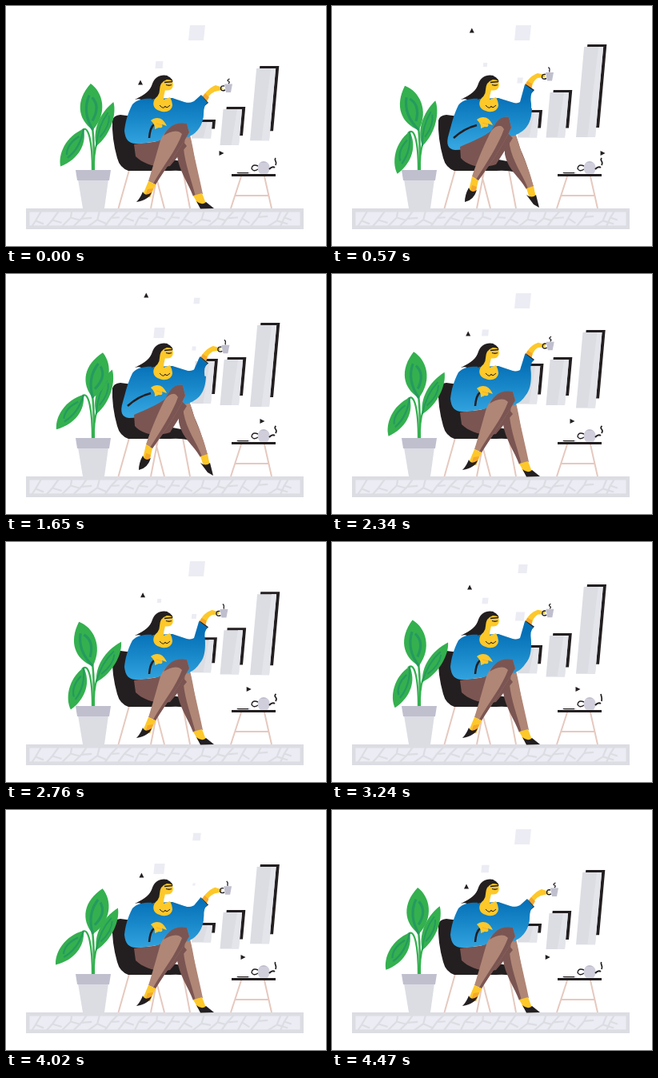
Write an HTML page with a canvas that moves like this. It is 400 by 300 pixels and loops after 4500 ms.

```html
<!DOCTYPE html>
<html lang="en">
<head>
<meta charset="utf-8">
<title>Coffee break</title>
<style>
html, body { margin: 0; width: 100%; height: 100%; overflow: hidden; background: #fff; }
canvas { display: block; }
</style>
</head>
<body>
<canvas id="stage" width="400" height="300"></canvas>
<script>
const ctx = document.getElementById('stage').getContext('2d');
const LOOP = 4500;
const BLACK = '#231f20', GREY = '#dcdde3', PALE = '#ececf4', LILAC = '#c0bfce',
      PINK = '#e6c9bf', SKIN = '#fdc82a', SHADE = '#f7a62b', LEAF = '#34b04f',
      LEAF_DARK = '#259a60', BROWN = '#7b5552', TAN = '#b08676';

const TIMES = [0, 570, 1095, 1650, 2340, 3240, 4020];

// Smooth periodic curve through values at TIMES, flat at its turning points.
function curve(t, values) {
  const n = TIMES.length;
  const time = k => TIMES[(k + n) % n] + LOOP * Math.floor(k / n);
  const value = k => values[(k + n) % n];
  const slope = k => (value(k + 1) - value(k)) / (time(k + 1) - time(k));
  const tangent = k => {
    const a = slope(k - 1), b = slope(k);
    return a * b > 0 ? 2 * a * b / (a + b) : 0;
  };
  let i = n - 1;
  while (TIMES[i] > t) i--;
  const h = time(i + 1) - time(i), s = (t - time(i)) / h;
  return value(i) * (1 + 2 * s) * (1 - s) ** 2 + value(i + 1) * s * s * (3 - 2 * s)
    + h * s * (1 - s) * (tangent(i) * (1 - s) - tangent(i + 1) * s);
}

const wave = (t, mean, amp, peak, period = LOOP / 2) =>
  mean + amp * Math.cos((t - peak) / period * 2 * Math.PI);

// Blend two paths that have the same commands.
function mix(a, b, k) {
  const end = b.match(/-?[\d.]+/g);
  let i = 0;
  return a.replace(/-?[\d.]+/g, v => +v + (end[i++] - v) * k);
}

function fill(path, color) {
  ctx.fillStyle = color;
  ctx.fill(new Path2D(path));
}

function line(path, color, width = 1) {
  ctx.strokeStyle = color;
  ctx.lineWidth = width;
  ctx.stroke(new Path2D(path));
}

function at(x, y, angle, draw) {
  ctx.save();
  ctx.translate(x, y);
  ctx.rotate(angle * Math.PI / 180);
  draw();
  ctx.restore();
}

function floor() {
  fill('M25 253H372V279H25Z', GREY);
  fill('M29.5 257.5H367.5V274.5H29.5Z', PALE);
  let seed = 7;
  const rnd = () => (seed = seed * 16807 % 2147483647) / 2147483647;
  for (let x = 32; x < 350; x += 14 + rnd() * 8) {
    const mid = x + 5 + rnd() * 8, y = 263 + rnd() * 6;
    line(`M${x} 276L${mid} ${y}L${x + 10 + rnd() * 8} 256M${mid} ${y}l${9 + rnd() * 5} ${rnd() * 8 - 2}`, GREY, 2.2);
  }
}

function square(x, y, size) {
  const r = size / 2, s = size * .05;
  fill(`M${x - r + s} ${y - r}H${x + r + s}L${x + r - s} ${y + r}H${x - r - s}Z`, PALE);
}

function bar(x, width, top, bottom) {
  const slab = (x, top, bottom, width) => {
    const lean = (bottom - top) * .09;
    return `M${x} ${bottom}l${lean} ${top - bottom}h${width}l${-lean} ${bottom - top}Z`;
  };
  fill(slab(x + 5, top - 3, bottom - 12, width), BLACK);
  fill(slab(x, top, bottom, width), GREY);
  const lean = (bottom - top) * .09;
  fill(`M${x + width} ${bottom}l${lean} ${top - bottom}h-6L${x + width * .6} ${bottom}Z`, '#e4e5eb');
}

function leaf(x, y, angle, length, width) {
  const shape = (w, l) =>
    `M0 0C${-w * 1.5} ${-l * .25} ${-w * 1.6} ${-l * .65} 0 ${-l}C${w * 1.2} ${-l * .8} ${w * 1.6} ${-l * .35} 0 0Z`;
  at(x, y, angle, () => {
    fill(shape(width, length), LEAF);
    const w = width, l = length;
    line(`M0 0Q${-w} ${-l * .4} ${-w * .2} ${-l * .75}M0 ${-l * .2}Q${w * .9} ${-l * .5} 1 ${-l * .7}`, LEAF_DARK, w * .25);
  });
}

function plant(t) {
  const lift = wave(t, 154, 3, 600);
  line('M109 207Q111 180 108 150', LEAF, 2.5);
  line(`M108 207C108 170 103 ${lift - 7} 95 ${lift + 2}`, LEAF, 2.2);
  line('M110 207Q109 185 114 170', LEAF, 2.2);
  leaf(97, lift, 207.5 - wave(t, 0, 12, 690), 55, 9);
  leaf(113, 175, wave(t, 24, 9, 3150, LOOP), 59, 7.5);
  leaf(108.5, 155, wave(t, -2.5, -15, 560), 58, 12.5);
  fill('M90 217H128L123 253H96Z', GREY);
  fill('M87 205H131L129 218H89Z', LILAC);
}

function table(t) {
  line('M294 213L281 253M323 213L332 253M286 237H328', PINK, 2);
  fill('M282 210H337V213H282Z', BLACK);
  fill('M287 208H306L302 210H291Z', LILAC);
  line('M289 208.5H303', BLACK);
  line('M315 200Q308 197 307 203Q309 208 315 204', BLACK, 1.4);
  fill('M317 196C313 201 315 208 318 209.5H327C330 206 331 200 327 196Z', '#cfceda');
  fill('M317 196Q322 192 327 196Z', LILAC);
  line('M329 204Q333 200 336 202', BLACK, 2);
  const sway = wave(t, 0, 1.3, 300, 1125);
  line(`M337 199q${1.5 + sway} -3 0 -5t${sway} -4`, BLACK, 1.7);
}

function chair() {
  line('M154 205L140.5 253M190 207L181 253M186 207L198 253M221 205L230 253', PINK, 2);
  fill('M133 143Q134 137 143 136L158 138L170 185L219 194Q228 199 229 208Q220 205 205 206H153Q142 202 139 190Q132 165 133 143Z', BLACK);
}

function head() {
  fill('M202 87C193 85 186 89 183 97C180 106 175 110 161 117Q170 114 172 122L190 122L200 100Z', BLACK);
}

function face() {
  fill('M191 101L199 105Q197 112 197 117L205 114Q211 125 205 130Q199 134 192 131C184 129 182 121 187 115Q191 111 191 101Z', SKIN);
  line('M192 124Q197 130 199 125Q200 129 205 124', BLACK);
  fill('M194 94Q202 88 207 92Q210 98 208 102Q205 107 198 105L191 104Z', SKIN);
  fill('M192 105Q192 95 201 92Q207 92 209 95Q206 87 198 87Q187 89 184 102L182 117Q192 114 192 105Z', BLACK);
  line('M198 95.5L208 94.5M200 98.5Q204 100 207 98.5', BLACK, 1.3);
}

function woman(p, q, t) {
  const legs = (a, b, color) => fill(mix(a, b, p), color);
  const arm = (a, b, color) => fill(mix(a, b, q), color);
  const blue = ctx.createLinearGradient(0, 114, 0, 176);
  blue.addColorStop(0, '#0670b7');
  blue.addColorStop(.5, '#1b8bcc');
  blue.addColorStop(1, '#35a6e0');

  // Far leg
  legs('M220 152C228 152 231 165 233 178C237 195 240 215 245 235L234 238C228 222 216 205 214 188Z',
       'M215 143C228 150 231 165 236 180C243 195 247 210 252 226L243 229C233 212 220 205 216 185Z', BROWN);
  legs('M226 152C231 160 233 175 236 190C240 208 243 220 246 235L237 238C231 215 224 198 222 178Z',
       'M221 145C229 154 232 170 238 186C244 199 248 210 252 226L245 228C237 208 226 195 222 174Z', TAN);
  legs('M234 237L245 234L250 247L240 248Z', 'M243 228L252 225L255 240L247 240Z', SKIN);
  legs('M238 244Q245 250 250 245L260 253L243 253.5Z',
       'M243 236Q250 241 255 236L259 252L252 248Z', BLACK);

  head();
  legs('M187 116C176 115 164 116 158 123C152 134 149 146 148 156C149 167 154 172 162 172C172 172 182 170 195 168L228 164C240 158 248 148 247 128L208 115Z',
       'M187 116C176 115 164 116 158 124C152 136 150 146 146 160C142 173 145 179 154 180C168 180 180 175 192 169L228 162C242 156 249 148 250 128L208 115Z', blue);

  // Raised arm
  arm('M245 114C250 107 256 101 262 99L271 102L270 105L261 107C255 110 252 113 250 121Z',
      'M241 100C244 92 249 87 257 84L266 86L266 89L257 90C252 93 250 98 249 106Z', SKIN);
  arm('M245 114L249 109L254 114L250 121Z', 'M241 100L244 94L250 97L249 106Z', SHADE);
  arm('M245 112L253 121L248 125Z', 'M241 97L253 105L249 109Z', BLACK);
  arm('M208 115C214 120 228 123 235 119L244 111L252 121Q247 124 247 135C246 150 238 158 228 162L212 150Z',
      'M208 115C214 120 228 124 235 120L241 98L252 106Q247 110 249 122C250 142 246 155 230 156L212 150Z', blue);
  face();

  // Lap and resting hand
  legs('M160 173C175 170 195 172 212 158L226 175L205 200C190 203 172 198 162 188Z',
       'M160 176C178 168 195 162 208 148L226 165L205 198C190 203 172 202 161 190Z', BROWN);
  line(mix('M185 148Q180 152 179 165', 'M152 165Q165 153 181 149', p), BLACK, 2.5);
  at(0, -p, 0, () => {
    fill('M181 143C188 138 196 139 201 150L195 148Q197 153 191 152L186 154Q187 149 181 143Z', SKIN);
    line('M188 147L195 149', SHADE, .8);
  });

  // Near leg
  legs('M226 147C212 144 200 152 193 168C188 185 183 204 178 219L187 223C200 202 218 178 229 158Z',
       'M221 139C210 136 203 150 197 160C188 178 180 198 175 213L183 218C196 200 214 175 224 152Z', TAN);
  legs('M226 147C212 144 203 151 197 162C206 156 215 154 220 160C213 180 195 202 184 222L187 223C200 202 218 178 229 158Z',
       'M221 139C210 136 204 147 199 156C206 148 212 148 215 154C208 174 192 198 180 217L183 218C196 200 214 175 224 152Z', BROWN);
  legs('M178 219L187 223L180 239L171 236Z', 'M175 213L183 218L179 235L171 231Z', SKIN);
  legs('M177 229L184 228L180 239L174 238Z', 'M175 224L181 226L179 235L173 233Z', SHADE);
  legs('M171 232Q174 239 182 233Q179 242 163 245Q168 240 171 232Z',
       'M171 227Q174 235 181 230Q177 243 166 245Q166 236 171 227Z', BLACK);

  at(277 - 6 * q, 103 - 14.5 * q, 0, () => {
    line('M-4 -3Q-9 -4 -8.5 1Q-7 4 -3 2', BLACK, 1.4);
    fill('M-4 -5.5H6L4 5H-2Z', LILAC);
    const sway = wave(t, 0, 1.5, 0, 1125);
    line(`M1 -6q${1 + sway} -2 0 -3t${sway} -3`, BLACK, 1.3);
  });
}

function draw(t) {
  ctx.fillStyle = '#fff';
  ctx.fillRect(0, 0, 400, 300);

  square(238.5, 33.5, Math.min(19, wave(t, 14.5, 9, 290)));
  square(191.5, 73.5, wave(t, 9, 4, 1700));
  square(235, 93, wave(t, 5.5, 5.5, 1050));

  const top1 = curve(t, [145, 133, 119, 109, 115, 132, 144]);
  const top2 = curve(t, [129, 108, 106, 107, 107, 117, 128]);
  const top3 = curve(t, [78, 51, 53, 64, 73, 56, 71]);
  bar(232, 24, top1, 162 + (top1 - 109) * .1);
  bar(267.5, 23.5, top2, 164 + (top2 - 107) * .45);
  bar(305, 24, top3, 164 + (top3 - 51) * .16);

  floor();
  chair();
  woman(curve(t, [0, 1, 1, 1, 0, 0, 0]), curve(t, [0, 1, .85, .6, .88, .95, .15]), t);
  plant(t);
  table(t);

  const triangle = 'M0 -3.5L3 2.5H-3Z';
  const y = curve(t, [96, 31, 18, 27, 75, 57, 82]);
  at(168 + (96 - y) * .105, y, 0, () => fill(triangle, BLACK));
  const x = curve(t, [269, 338, 352, 320, 300, 307, 296]);
  at(x, 184, 90, () => fill(triangle, BLACK));
}

function tick() {
  draw(performance.now() % LOOP);
  requestAnimationFrame(tick);
}
tick();
</script>
</body>
</html>
```
